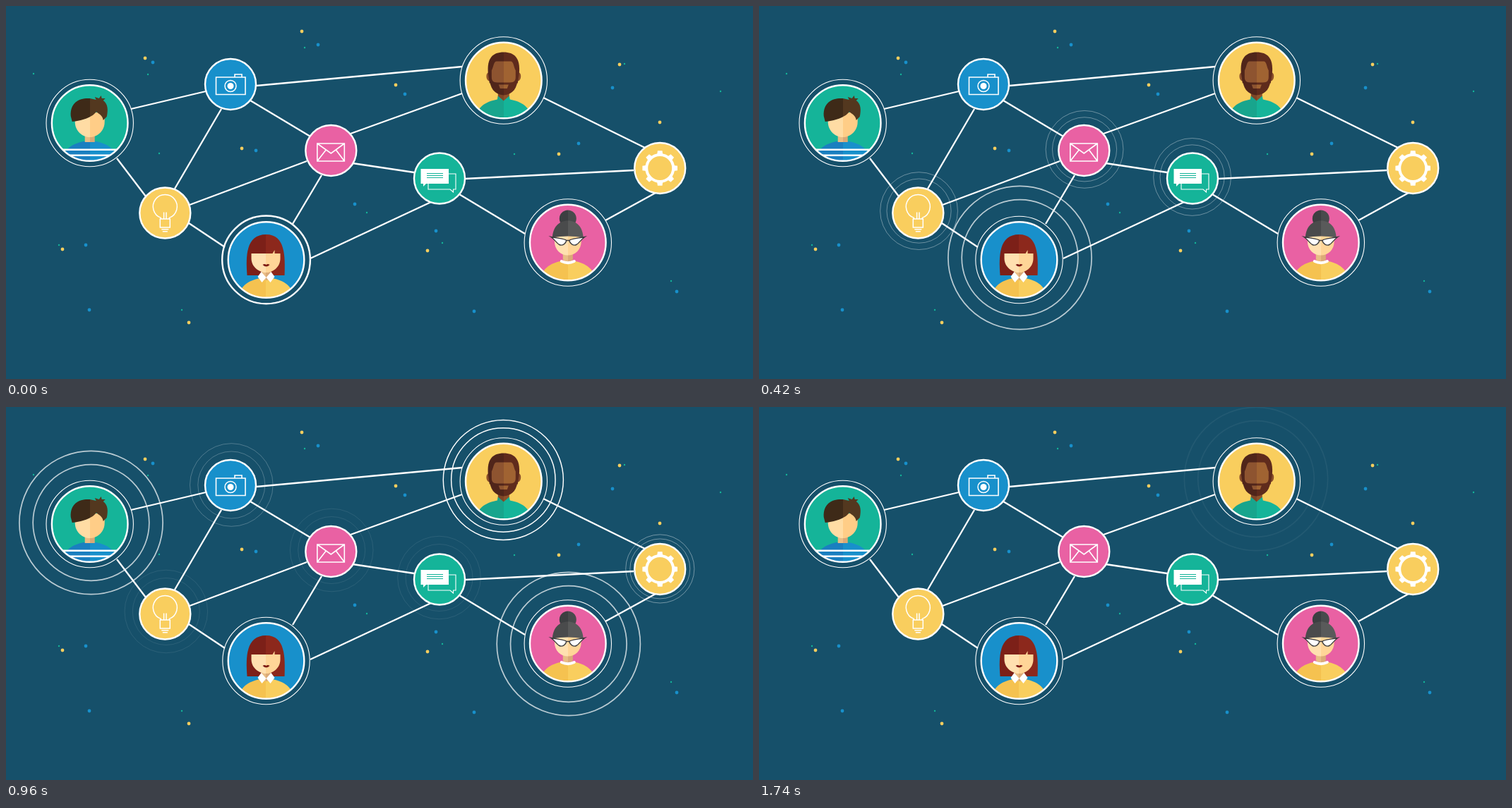
Recreate the animation shown at these times as an HTML page with a canvas. Size 1058 by 529 pixels, loop 2070 ms.

```html
<!DOCTYPE html>
<html lang="en">
<head>
<meta charset="utf-8">
<title>Connected people</title>
<style>
html, body { margin: 0; width: 100%; height: 100%; overflow: hidden; background: #16506a; }
canvas { display: block; width: 1058px; height: 529px; }
</style>
</head>
<body>
<canvas width="1058" height="529"></canvas>
<script>
const ctx = document.querySelector('canvas').getContext('2d');
const LOOP = 2070, STEP = 30, LAST_STEP = 1740, GROW = 218;
const NAVY = '#16506a', TEAL = '#15b499', BLUE = '#1890cb', PINK = '#e961a3', YELLOW = '#f9ce5e', WHITE = '#fff';

const dots = [
  [YELLOW, 2.4, [[197,74],[419,36],[552,112],[869,83],[926,165],[783,210],[334,202],[80,345],[259,449],[597,347]]],
  [BLUE, 2.4, [[208,80],[442,55],[565,125],[859,116],[811,195],[354,205],[494,281],[609,319],[113,339],[118,431],[663,433],[950,405]]],
  [TEAL, 1.2, [[39,96],[201,97],[423,59],[876,82],[1012,121],[720,210],[217,209],[511,293],[618,336],[75,339],[249,431],[942,390]]]
];
const links = `M177 146L283 121 M157 216L198 270 M305 146L239 259 M355 113L646 86 M346 134L431 185
  M260 282L426 220 M259 308L310 342 M488 181L646 124 M447 240L406 309 M491 223L578 236
  M431 358L602 278 M650 245L889 233 M642 267L735 323 M761 130L907 202 M849 304L920 265`;

// Each node pulses from its `start`; its rings drift by `drift` while growing.
const nodes = [
  { x: 118.7, y: 166, color: TEAL, big: true, start: 531, drift: [1.8, -2], draw: boy },
  { x: 704.8, y: 105.5, color: YELLOW, big: true, start: 832, drift: [-.8, -3.5], draw: man },
  { x: 368.5, y: 360, color: BLUE, big: true, start: -8, drift: [1, -3], draw: woman },
  { x: 795.8, y: 335.5, color: PINK, big: true, start: 531, drift: [1, .5], draw: lady },
  { x: 318, y: 111, color: BLUE, start: 540, drift: [1.3, -.5], draw: camera },
  { x: 225.3, y: 293.5, color: YELLOW, start: 240, drift: [1.5, -3.5], draw: bulb },
  { x: 460.3, y: 205, color: PINK, start: 240, drift: [.9, -2], draw: mail },
  { x: 614, y: 244.5, color: TEAL, start: 240, drift: [-.5, -2.5], draw: chat },
  { x: 926.2, y: 230, color: YELLOW, start: 842, drift: [.2, -1], draw: gear }
];

function fill(d, color) {
  ctx.fillStyle = color;
  ctx.fill(new Path2D(d));
}
// Two flat tones meeting at the vertical centre line.
function halves(d, left, right) {
  const tones = ctx.createLinearGradient(-60, 0, 60, 0);
  tones.addColorStop(.5, left);
  tones.addColorStop(.5, right);
  fill(d, tones);
}
function stroke(d, width = 1.6, color = WHITE) {
  ctx.lineWidth = width;
  ctx.strokeStyle = color;
  ctx.stroke(new Path2D(d));
}
function circle(x, y, r, color) {
  ctx.beginPath();
  ctx.arc(x, y, r, 0, 7);
  ctx.fillStyle = color;
  ctx.fill();
}
function ring(x, y, r, width) {
  ctx.beginPath();
  ctx.arc(x, y, r, 0, 2 * Math.PI);
  ctx.lineWidth = width;
  ctx.strokeStyle = WHITE;
  ctx.stroke();
}
function mirrored(draw) {
  draw();
  ctx.save();
  ctx.scale(-1, 1);
  draw();
  ctx.restore();
}

const shoulders = 'M-41 60C-39 38 -27 30 -9 26H9C27 30 39 38 41 60Z';
const neck = 'M-7 12H7V24Q0 34 -7 24Z';

function boy() {
  halves(shoulders, '#1a7fc0', BLUE);
  fill('M-50 36.5H50V39H-50Z M-50 44.5H50V47H-50Z', WHITE);
  halves('M-7 12H7V27H-7Z', '#e9bd85', '#d9a877');
  halves('M-21 -15H21V-2C21 12 10 20 0 20C-10 20 -21 12 -21 -2Z', '#ffdca4', '#ffcd87');
  halves('M-27 -10C-28 -30 -14 -36 0 -35L9 -33 7 -37 13 -35 16 -39 17 -35 22 -35 19 -32C26 -27 26 -18 24 -9L19 -4C18 -11 13 -13 9 -16C4 -8 -13 -3 -25 -2Z', '#3e2a18', '#53381f');
}
function man() {
  mirrored(() => { fill('M-20 -11C-26 -13 -26 2 -19 1Z', '#8a4f2a'); });
  halves('M-22 -10C-24 -32 -15 -40 0 -40C15 -40 24 -32 22 -10L20 4H-20Z', '#50251a', '#5f2b1c');
  halves('M-8 14H8V32H-8Z', '#7e4526', '#8f5129');
  halves('M-20 -5H20C20 11 13 20 0 21C-13 20 -20 11 -20 -5Z', '#50251a', '#5f2b1c');
  halves('M-17 -14C-14 -20 -14 -27 -10 -27H10C14 -27 14 -20 17 -14V-5C17 4 12 3 0 3C-12 3 -17 4 -17 -5Z', '#8e5430', '#a06332');
  halves('M-7 6H7L5 11.5H-5Z', '#8e5430', '#a06332');
  halves('M-40 60C-39 38 -28 31 -9 27L-8 22 0 29 8 22 9 27C28 31 39 38 40 60Z', '#18a58d', TEAL);
}
function woman() {
  halves('M-27 22C-29 -5 -29 -36 0 -36C27 -36 27 -5 26 22Z', '#7c2018', '#8c281c');
  halves(shoulders, '#f5c250', YELLOW);
  halves(neck, '#e9bd85', '#dbaa78');
  halves('M-21 -9H9L12 -14V-9H20V-2C20 10 10 18 0 18C-10 18 -21 10 -21 -2Z', '#ffe0b0', '#ffd597');
  fill('M-5 7Q-2 5 0 7Q2 5 5 7Q0 12 -5 7Z', '#7c1a14');
  mirrored(() => fill('M-7 17L0 25 -6 32 -12 24Z', WHITE));
}
function lady() {
  halves(shoulders, '#f5c250', YELLOW);
  halves(neck, '#e9bd85', '#dbaa78');
  halves('M-19 -11H19V-3C19 11 10 18 0 18C-10 18 -19 11 -19 -3Z', '#ffe0b0', '#ffd597');
  halves('M-12 -34A12 12 0 0 1 12 -34A12 12 0 0 1 -12 -34Z', '#3c3f41', '#484b4c');
  halves('M-22 -7C-21 -22 -13 -31 0 -31C13 -31 21 -22 22 -7Q0 -11 -22 -7Z', '#4a4b4c', '#595a5a');
  mirrored(() => {
    const lens = 'M-24 -8C-16 -6 -5 -6 -2 -3C-3 2 -8 5 -12 3C-16 1 -17 -3 -24 -8Z';
    fill(lens, WHITE);
    stroke(lens, 1.4, '#3b3b3d');
  });
  stroke('M-2 -3H2', 1.4, '#3b3b3d');
  ctx.lineCap = 'round';
  stroke('M-9 26.5Q0 31 9 26.5', 4);
}
function camera() {
  stroke('M-20.5 -10H21V14.5H-20.5Z M6 -10V-14H16V-10');
  ring(0, 2.5, 8, 1.5);
  circle(0, 2.5, 4.5, WHITE);
}
function bulb() {
  stroke('M-6 8.5V6.9A17 17 0 1 1 6 6.9V8.5 M-7 8.5H7V20.5H-7Z M-5 23.3H5 M-3.5 26.3H3.5 M-1.7 -1V8.5 M1.7 -1V8.5', 1.5);
}
function mail() {
  stroke('M-19.5 -10H19V15H-19.5Z L0 4L19 -10 M-19.5 15L-7 -1 M19 15L7 -1');
}
function chat() {
  stroke('M-16 -6.5H23V15.5H19.5V19.5L15 15.5H-16Z', 1.1);
  fill('M-26.5 -13.5H13V7.5H-19L-23 11.5V7.5H-26.5Z', WHITE);
  stroke('M-18 -7H5 M-18 -4H5 M-18 -1H5', 1, TEAL);
}
function gear() {
  ring(0, 0, 19, 4);
  for (let i = 0; i < 8; i++) {
    fill('M-4 -19.5L-3.3 -24.8H3.3L4 -19.5Z', WHITE);
    ctx.rotate(Math.PI / 4);
  }
}

function drawPulse({ x, y, big, start, drift }, time) {
  const age = time - start;
  if (age < 0) return;
  const grown = Math.min(age / GROW, 1);
  const alpha = big ? 1 - Math.max(0, age - 210) / 740 : .45 * (1 - age / 900);
  const [from, inner, outer] = big ? [61.5, 82.3, 101.6] : [36.5, 47.5, 58.8];
  ctx.globalAlpha = Math.max(0, Math.min(1, alpha));
  for (const to of [inner, outer]) {
    ring(x + drift[0] * grown, y + drift[1] * grown, from + (to - from) * grown, big ? 1.1 + .6 * grown : 1);
  }
  ctx.globalAlpha = 1;
}
function drawNode({ x, y, color, big, draw }) {
  const r = big ? 53.8 : 36;
  ctx.save();
  ctx.translate(x, y);
  if (big) ring(0, 0, 61.7, 1.1);
  circle(0, 0, r, color);
  ctx.save();
  ctx.beginPath();
  ctx.arc(0, 0, r, 0, 7);
  ctx.clip();
  draw();
  ctx.restore();
  ring(0, 0, r, 2.4);
  ctx.restore();
}
function frame(now) {
  const time = Math.min(Math.floor(now % LOOP / STEP) * STEP, LAST_STEP);
  ctx.fillStyle = NAVY;
  ctx.fillRect(0, 0, 1058, 529);
  for (const [color, r, places] of dots) {
    for (const [x, y] of places) circle(x, y, r, color);
  }
  stroke(links, 2.3);
  for (const node of nodes) drawPulse(node, time);
  for (const node of nodes) drawNode(node);
  requestAnimationFrame(frame);
}
frame(performance.now());
</script>
</body>
</html>
```
